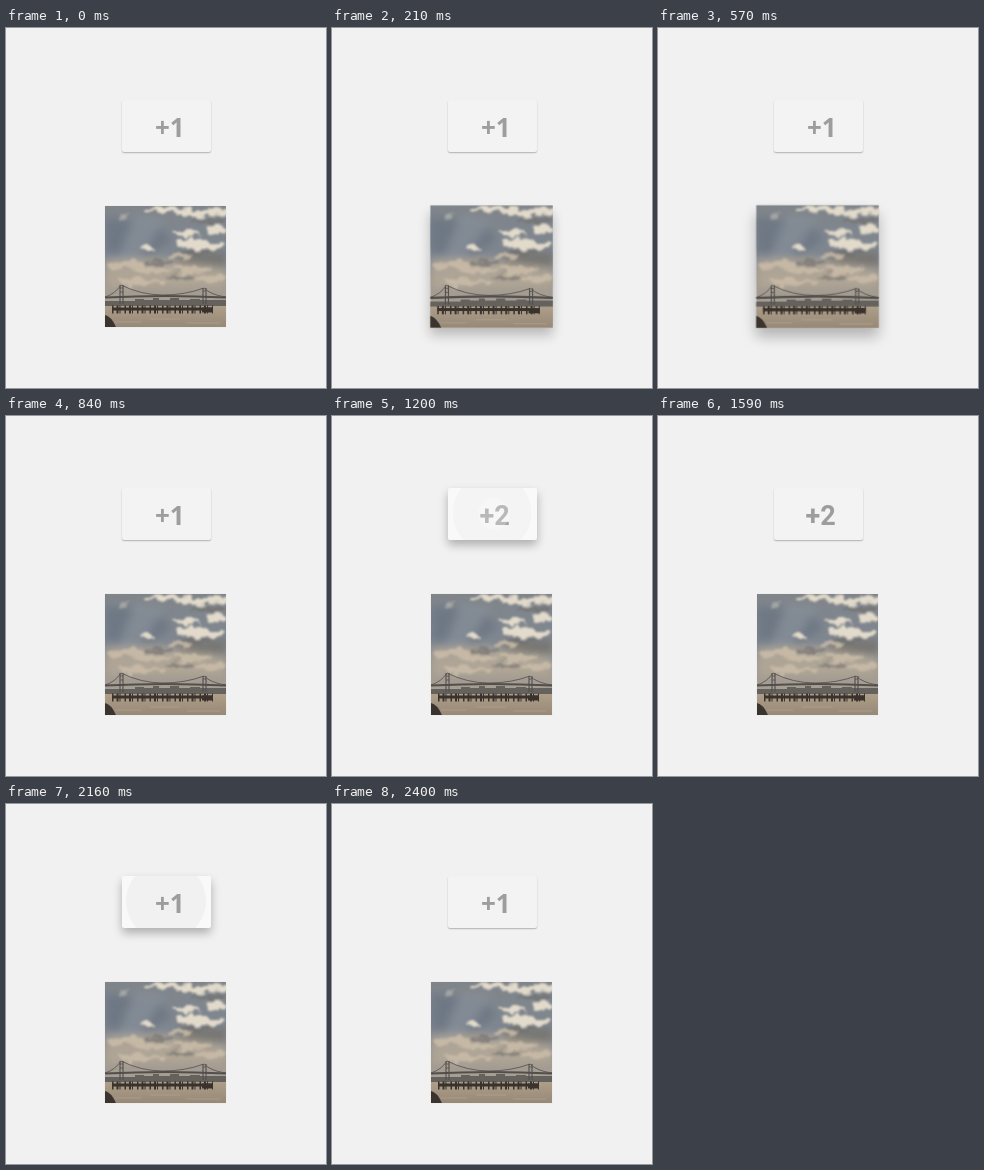
An HTML page that plays this animation: 320x360 px, repeating every 2670 ms.

```html
<!DOCTYPE html>
<html lang="en">
<head>
<meta charset="utf-8">
<title>Lift and press</title>
<style>
  html, body { margin: 0; width: 100%; height: 100%; overflow: hidden; background: #f1f1f1; }
  .photo, .card { position: absolute; }
  .photo, .card, .card * { animation: 2670ms linear infinite; }

  .photo { left: 99px; top: 178px; width: 121px; height: 121px; animation-name: lift-photo; }
  .photo svg { display: block; }

  .card {
    left: 116px; top: 72px; width: 89px; height: 52px;
    border-radius: 2px; overflow: visible; animation-name: lift-card;
  }
  .clip { position: absolute; inset: 0; overflow: hidden; border-radius: 2px; }
  .wave, .glow { position: absolute; border-radius: 50%; opacity: 0; }
  .wave { left: -6px; top: -25px; width: 100px; height: 100px; background: #ececec; animation-name: wave; }
  .glow { left: 24px; top: 4px; width: 44px; height: 44px; background: #fff; animation-name: glow; }
  .card svg { position: absolute; left: 0; top: 0; }
  text { fill: #9d9d9d; font-weight: 700; }
  .one { font-family: "Open Sans", sans-serif; font-size: 26px; animation-name: one; }
  .two { font-family: Roboto, sans-serif; font-size: 27px; animation-name: two; }

  @keyframes lift-photo {
    0%, 1.1% { transform: none; box-shadow: 0 0 1px rgba(0,0,0,.1); animation-timing-function: ease-out; }
    11.2%, 21% { transform: scale(1.0165); box-shadow: 0 9px 13px rgba(0,0,0,.26); animation-timing-function: ease-in-out; }
    31%, 100% { transform: none; box-shadow: 0 0 1px rgba(0,0,0,.1); }
  }
  @keyframes lift-card {
    0%, 39.3%, 59.5%, 71.9%, 89.9%, 100% {
      background: #f3f3f3; box-shadow: 0 1px 1.5px rgba(0,0,0,.27);
      animation-timing-function: ease-out;
    }
    43.8%, 51.7%, 77.5%, 84.3% {
      background: #f9f9f9; box-shadow: 0 5px 10px rgba(0,0,0,.28);
      animation-timing-function: ease-in-out;
    }
  }
  @keyframes wave {
    0%, 40.4% { transform: scale(0); opacity: .6; }
    44.9% { transform: scale(.78); opacity: .45; }
    52% { transform: scale(1.05); opacity: 0; }
    52.1%, 75.3% { transform: scale(0); opacity: 0; }
    75.4% { transform: scale(0); opacity: .6; }
    80.9%, 84.2% { transform: scale(.8); opacity: .6; }
    88.5% { transform: scale(1.05); opacity: 0; }
    100% { transform: scale(1.05); opacity: 0; }
  }
  @keyframes glow {
    0%, 42% { transform: scale(0); opacity: .5; }
    44.9% { transform: scale(.7); opacity: .3; }
    48.5% { transform: scale(1.2); opacity: 0; }
    48.6%, 100% { transform: scale(0); opacity: 0; }
  }
  @keyframes one {
    0%, 42.7% { opacity: 1; }
    44.4%, 77.5% { opacity: 0; }
    79.8%, 100% { opacity: 1; }
  }
  @keyframes two {
    0%, 42.7% { opacity: 0; }
    44.4%, 77.5% { opacity: 1; }
    79.8%, 100% { opacity: 0; }
  }
</style>
</head>
<body>
<div class="card">
  <div class="clip"><div class="wave"></div></div>
  <svg width="89" height="52">
    <text class="one" x="33" y="36.5">+1</text>
    <text class="two" x="31.5" y="37">+2</text>
  </svg>
  <div class="clip"><div class="glow"></div></div>
</div>

<div class="photo">
  <svg width="121" height="121" viewBox="0 0 121 121">
    <defs>
      <linearGradient id="sky" x2="0" y2="1">
        <stop offset="0" stop-color="#80858a"/>
        <stop offset=".4" stop-color="#7f8791"/>
        <stop offset=".65" stop-color="#9c9790"/>
        <stop offset="1" stop-color="#b9ab97"/>
      </linearGradient>
      <linearGradient id="water" x2="0" y2="1">
        <stop offset="0" stop-color="#b1a18c"/>
        <stop offset="1" stop-color="#978977"/>
      </linearGradient>
      <filter id="ragged" x="-20%" y="-20%" width="140%" height="140%">
        <feTurbulence type="fractalNoise" baseFrequency=".09" numOctaves="3" seed="4"/>
        <feDisplacementMap in="SourceGraphic" scale="12" xChannelSelector="R" yChannelSelector="G"/>
        <feGaussianBlur stdDeviation=".9"/>
      </filter>
      <filter id="soft" x="-20%" y="-20%" width="140%" height="140%">
        <feGaussianBlur stdDeviation="4"/>
      </filter>
    </defs>

    <rect width="121" height="121" fill="url(#sky)"/>
    <g filter="url(#soft)">
      <path d="M0 12 L52 16 L66 34 L40 52 L0 46Z" fill="#6e7884"/>
      <path d="M30 10 L60 14 L30 60 L12 56Z" fill="#8f979f" opacity=".6"/>
      <path d="M70 48 L121 46 V60 L76 58Z" fill="#77746f"/>
      <path d="M0 54 L50 52 L121 64 V82 H0Z" fill="#b8ab99" opacity=".75"/>
    </g>
    <g filter="url(#ragged)" fill="#e2dacb">
      <ellipse cx="62" cy="4" rx="20" ry="3"/>
      <ellipse cx="92" cy="7" rx="17" ry="4"/>
      <ellipse cx="113" cy="6" rx="10" ry="4"/>
      <ellipse cx="112" cy="24" rx="10" ry="5"/>
      <ellipse cx="80" cy="28" rx="13" ry="3"/>
      <ellipse cx="88" cy="38" rx="16" ry="5"/>
      <ellipse cx="109" cy="40" rx="13" ry="4"/>
      <ellipse cx="43" cy="42" rx="8" ry="3"/>
      <ellipse cx="18" cy="11" rx="4" ry="2" opacity=".4"/>
      <g fill="#cbbda9" opacity=".85">
        <ellipse cx="22" cy="59" rx="20" ry="4"/>
        <ellipse cx="48" cy="64" rx="17" ry="4"/>
        <ellipse cx="75" cy="50" rx="11" ry="3"/>
        <ellipse cx="86" cy="64" rx="20" ry="3"/>
        <ellipse cx="106" cy="72" rx="15" ry="3"/>
        <ellipse cx="35" cy="76" rx="24" ry="3"/>
      </g>
      <g fill="#716f6e" opacity=".65">
        <ellipse cx="104" cy="15" rx="16" ry="3"/>
        <ellipse cx="91" cy="46" rx="15" ry="2"/>
        <ellipse cx="55" cy="56" rx="15" ry="2"/>
        <ellipse cx="76" cy="70" rx="14" ry="2"/>
      </g>
    </g>

    <rect y="97" width="121" height="24" fill="url(#water)"/>
    <path d="M0 95 H30 V93 H39 V94 H48 V92 H54 V94 H65 V92 H74 V94 H85 V93 H95 V94 H121 V100 H0Z" fill="#65625e"/>
    <g fill="none" stroke="#514e4c">
      <path d="M0 91 Q10 88 16 79 Q36 89 58 89 Q80 89 99 82 Q106 89 121 91" stroke-width=".8"/>
      <path d="M0 91.5 Q60 88.5 121 91.5" stroke-width="2.2"/>
      <path d="M15 79 V98 M18 79 V98 M98 82 V98 M101 82 V98" stroke-width="1.1"/>
      <path d="M15 82 H18 M15 86 H18 M98 85 H101" stroke-width=".8"/>
    </g>
    <g stroke="#39322d">
      <path d="M7 103 H108" stroke-width="3"/>
      <path d="M7 103.5 H108" stroke-width="8" stroke-dasharray="1.5 3 2 1 1 4" />
      <path d="M97 104 H108" stroke-width="5"/>
    </g>
    <path d="M0 109 Q6 110 11 121 H0Z" fill="#3b342e"/>
    <path d="M10 116 H36 M45 113 H75 M82 117 H115" stroke="#b9aa96" opacity=".5"/>
  </svg>
</div>
</body>
</html>
```
